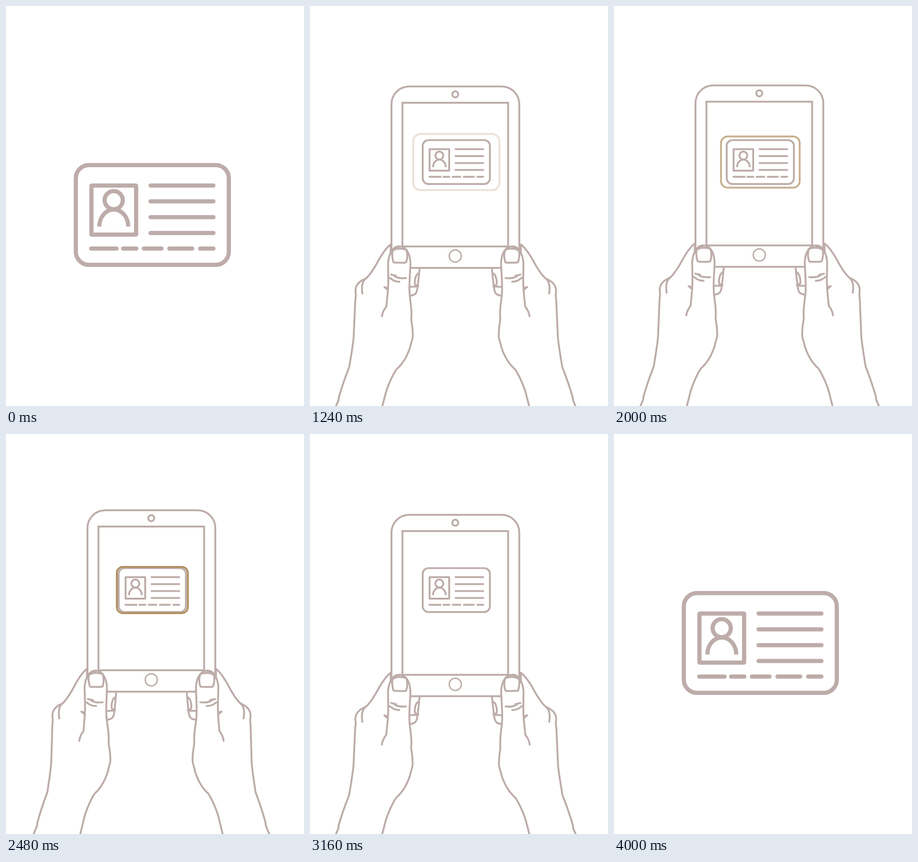
An HTML page that plays this animation: 640 by 860 pixels, repeating every 4240 ms.

```html
<!DOCTYPE html>
<html lang="en">
<head>
<meta charset="utf-8">
<title>Scanning an ID card</title>
<style>
  html, body { margin: 0; width: 100%; height: 100%; overflow: hidden; background: #fff; }
  svg { display: block; width: 100%; height: 100%; }
  .ink { fill: none; stroke: #bdaca9; stroke-width: 4; stroke-linecap: round; stroke-linejoin: round; }
  .white { fill: #fff; }
</style>
</head>
<body>
<svg viewBox="0 0 640 860">
  <defs>
    <g id="handBack">
      <path d="M174 357V341C160 352 149 374 143 386C136 398 128 411 121 416C107 422 100 430 100 442L101 452L100 464L98 544C96 566 93 584 90 606C83 625 75 648 69 671L68 679L61 696L50 724"/>
      <path d="M121 416C113 424 113 435 115 448"/>
      <path d="M217 389H237C236 404 235 418 233 433C232 447 227 449 218 450.500M218 431.500L235 430.500"/>
      <path d="M235.500 402C229 403 226 418 227.500 426C229 429 232 428 234 427"/>
    </g>
    <g id="handFront">
      <path class="white" d="M158 496C159 488 163 480 167 475C168 459 171 436 170 418C170 403 169 392 169 380C170 366 176 345 192 345C207 345 216 360 217 381C217 398 215 418 216 440C217 462 223 477 221 502C224 517 225 529 225 538C224 550 220 554 220 561C214 579 208 592 195 606C188 610 173 645 169 662C166 675 163 687 161 696L152 724" />
      <path d="M178 355C176 366 179 373 180 378Q181 380 184 380H204Q208 380 208.500 376C211 367 210 360 208 353C203 349 185 348 178 355Z"/>
      <path d="M175 361C176 352 183 347 192 346"/>
      <path d="M176 406L187 408.500M182 408C189 414 198 414 208 413M173 413C180 418 184 421 194 421"/>
      <path d="M162 433L168 435V438Z"/>
    </g>
  </defs>

  <g id="card" class="ink" style="stroke-width:9">
    <rect x="150" y="342" width="328.500" height="214.500" rx="28"/>
    <rect x="183.500" y="386" width="96" height="105.500" rx="1"/>
    <circle cx="231.300" cy="417.500" r="19.500"/>
    <path stroke-linecap="butt" d="M200.500 474C200.500 453 215 437.500 231.500 437.500S262.500 453 262.500 474"/>
    <path d="M310.500 386H445.500M310.500 420H445.500M310.500 454H445.500M310.500 488H445.500"/>
    <path d="M183 521.500H237.500M251.500 521.500H280M296 521.500H334M351 521.500H400M417 521.500H445.500"/>
  </g>

  <rect id="focus" class="ink" style="stroke:#b28f60"/>

  <g id="device" class="ink">
    <g class="left"><use href="#handBack"/></g>
    <g class="right"><use href="#handBack"/></g>
    <path class="white" fill-rule="evenodd" stroke-linejoin="miter"
      d="M175 370V38A38 38 0 0 1 213 0H411.500A38 38 0 0 1 449.500 38V370Q449.500 390 429.500 390H195Q175 390 175 370Z
         M198.500 35H425.500V344H198.500Z
         M305.500 17a6.500 6.500 0 1 0 13 0a6.500 6.500 0 1 0 -13 0Z"/>
    <circle cx="312" cy="364.500" r="13" stroke-width="3" style="stroke-width:3"/>
    <g class="left"><use href="#handFront"/></g>
    <g class="right"><use href="#handFront"/></g>
  </g>
</svg>
<script>
  const LOOP = 4240, STEP = 40, CENTER = 312.25;
  const TOP = 162, BOB = 17.5;
  const turns = [1000, 1410, 1800, 2200, 2560, 3010, 3400];

  const find = id => document.getElementById(id);
  const card = find('card'), focusBox = find('focus'), device = find('device');
  const place = (el, transform) => el.setAttribute('transform', transform);
  const show = (el, on) => el.setAttribute('visibility', on ? 'visible' : 'hidden');
  const clamp = v => Math.max(0, Math.min(1, v));
  const part = (t, from, to) => clamp((t - from) / (to - from));
  const mix = (a, b, p) => a + (b - a) * p;

  // 0 at the top of the sway, 1 at the bottom
  function swayAt(t) {
    const i = turns.findIndex((start, n) => t >= start && t < turns[n + 1]);
    if (i < 0) return 0;
    const eased = (1 - Math.cos(Math.PI * part(t, turns[i], turns[i + 1]))) / 2;
    return i % 2 ? 1 - eased : eased;
  }

  function drawCard(t) {
    const small = part(t, 0, 240) - part(t, 3800, 4000);
    const scale = mix(1, 0.4395, small);
    place(card, `translate(314.2 ${mix(449.2, 335.5, small)}) scale(${scale}) translate(-314.2 -449.2)`);
  }

  function drawFocus(t) {
    const shrink = part(t, 960, 2680) ** 1.7;
    const w = mix(187, 144.5, shrink), h = mix(122, 94, shrink);
    const attrs = {
      x: 314.3 - w / 2, y: 335.5 - h / 2, width: w, height: h, rx: mix(16, 12, shrink),
      opacity: Math.min(1, 0.1 + (t - 960) / 1720) * (1 - part(t, 2680, 2960))
    };
    for (const name in attrs) focusBox.setAttribute(name, attrs[name]);
    show(focusBox, t > 1000 && t < 2960);
  }

  function drawDevice(t) {
    const sway = swayAt(t);
    const enter = part(t, 360, 520);
    let y = mix(860, 382, enter);
    y = mix(y, TOP, part(t, 720, 920)) + BOB * sway;
    y = mix(y, 862, part(t, 3520, 3680));
    place(device, `translate(${CENTER} ${y}) scale(${mix(3, 1, enter)}) translate(${-CENTER} 0)`);
    show(device, t >= 400 && t < 3680);

    const turn = `rotate(${1.75 * sway} 192 366)`;
    document.querySelectorAll('.left').forEach(g =>
      place(g, `translate(${-1.5 * sway} ${-2 * sway}) ${turn}`));
    document.querySelectorAll('.right').forEach(g =>
      place(g, `translate(${2 * CENTER + 4 * sway} ${-2 * sway}) scale(-1 1) ${turn}`));
  }

  function render(time) {
    const t = Math.floor((time % LOOP) / STEP) * STEP;
    drawCard(t);
    drawFocus(t);
    drawDevice(t);
  }

  const begin = performance.now();
  function tick() {
    render(performance.now() - begin);
    requestAnimationFrame(tick);
  }
  tick();
</script>
</body>
</html>
```
